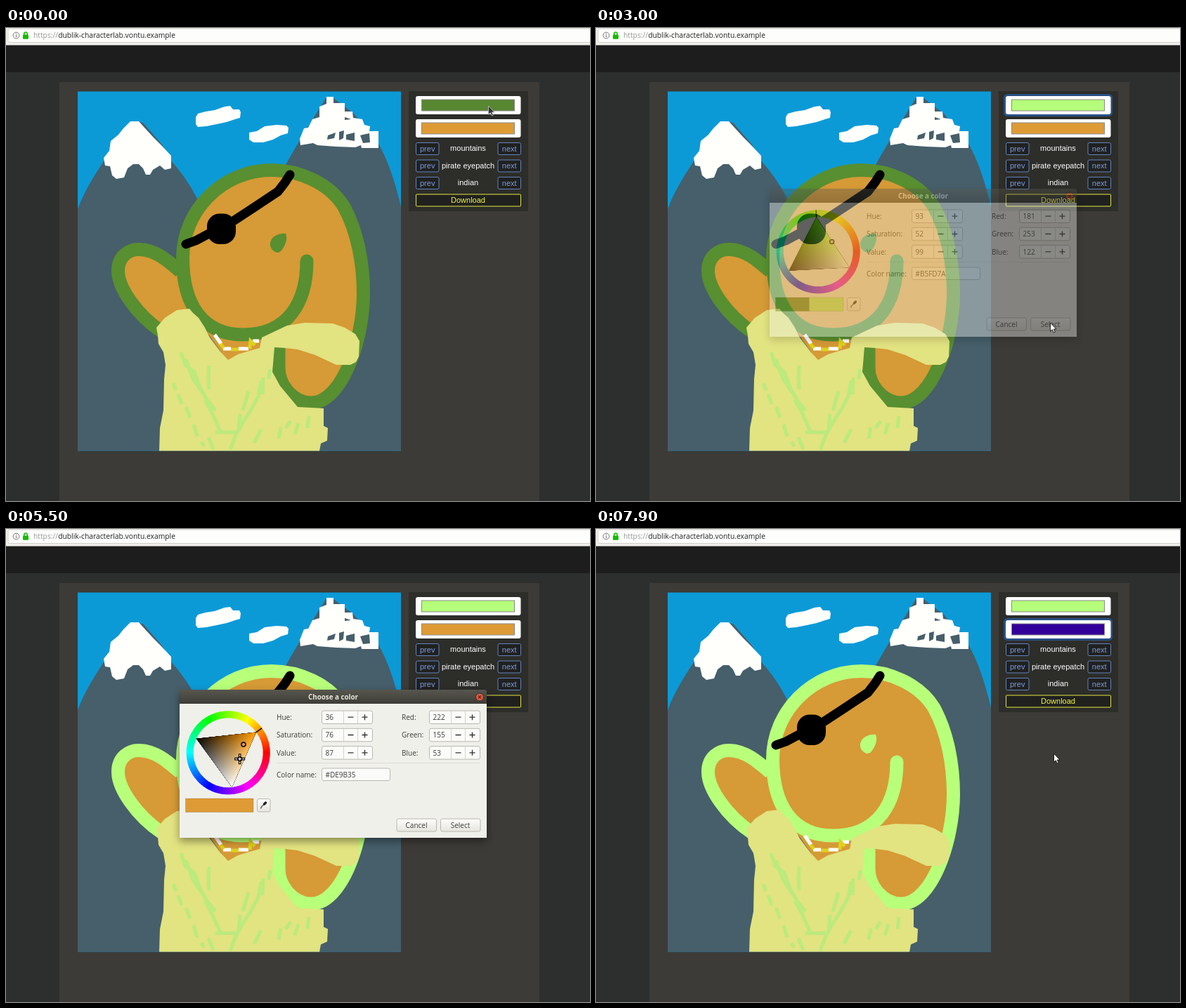
An HTML page for the animation above (8 s loop, 831 by 674 pixels).

```html
<!DOCTYPE html>
<html lang="en">
<head>
<meta charset="utf-8">
<title>Character colors</title>
<style>
html, body { margin: 0; width: 100%; height: 100%; overflow: hidden; background: #2d2f2e; }
svg { display: block; width: 100%; height: 100%; }
text { white-space: pre; }
.page { font: 11px "Liberation Sans", Arial, sans-serif; }
.ui { font: 10px "Open Sans", "Noto Sans", sans-serif; fill: #3c3c38; }
.add { mix-blend-mode: plus-lighter; }
#dialog { filter: drop-shadow(0 5px 6px rgba(0,0,0,.4)); }
</style>
</head>
<body>
<svg viewBox="0 0 831 674" preserveAspectRatio="none">
  <defs>
    <clipPath id="frame"><rect x="102" y="90.5" width="460" height="512"/></clipPath>
    <linearGradient id="title" x2="0" y2="1"><stop stop-color="#57564e"/><stop offset="1" stop-color="#3d3c37"/></linearGradient>
    <linearGradient id="button" x2="0" y2="1"><stop stop-color="#fdfdfb"/><stop offset="1" stop-color="#e6e5df"/></linearGradient>
    <linearGradient id="toHue" gradientUnits="userSpaceOnUse" x1="49.5" y1="0" x2="-24.75" y2="0"><stop id="hueStop"/><stop offset="1"/></linearGradient>
    <linearGradient id="toWhite" gradientUnits="userSpaceOnUse" x1="-24.75" y1="42.87" x2="12.37" y2="-21.43"><stop stop-color="#fff"/><stop offset="1"/></linearGradient>
  </defs>

  <rect width="831" height="674" fill="#2d2f2e"/>
  <rect y="24" width="831" height="39" fill="#1c1d1c"/>
  <rect width="831" height="24.5" fill="#f0efeb"/>
  <rect x="3" y="1" width="840" height="19.5" rx="2" fill="#fdfdfb" stroke="#d3d1ca"/>
  <circle cx="14.5" cy="10.5" r="4.4" fill="none" stroke="#777"/>
  <path d="M14.5 9.8V13M14.5 7.6V8.8" stroke="#777" stroke-width="1.1"/>
  <path d="M25.8 10V8.2a2.2 2.2 0 0 1 4.4 0V10" fill="none" stroke="#12bc00" stroke-width="1.6"/>
  <rect x="24" y="9.5" width="8" height="6.3" rx="1" fill="#12bc00"/>
  <text x="39" y="14.3" class="ui" style="font-size:10.3px"><tspan fill="#999">https://</tspan><tspan fill="#222">dublik-characterlab.vontu.example</tspan></text>

  <rect x="76" y="77" width="683" height="597" fill="#3c3b37"/>
  <g clip-path="url(#frame)">
    <rect x="102" y="90" width="460" height="513" fill="#0c9ad7"/>
    <path fill="#465f6a" d="M102 258Q112 230 139 190L181 133 195 135 222 166 235 189Q258 215 272 243L300 300 360 270Q385 215 418 160L455 100 465 99 495 122 530 165Q549 198 562 255V603H102Z"/>
    <g fill="#fffffc">
      <path d="M177 133H189L198 143 209 155 219 165 235 182V200L226 202 219 196 209 202 205 209 199 209 195 200 189 194 181 194 173 200 168 213 157 215 151 210 148 197 141 196 139 185 147 175 149 161 160 152 167 143Z"/>
      <path d="M456 98H466V107H482V119H493L494 128 507 130 510 138 518 140 517 147H530V171H506L505 167 497 170 470 169 443 167 437 164 419 167 418 158 424 143 430 142 436 130 446 127V112L456 108Z"/>
      <path d="M270 127L273 122 284 119 297 117 311 112 319 111 323 116H332L334 120 333 128 326 130 314 134 300 137 285 140 273 141 270 137Z"/>
      <path d="M346 149L357 147 368 140 385 138 399 139 402 142 401 150 391 153 380 159 366 163H352L346 159Z"/>
    </g>
    <path fill="#465f6a" d="M458 153L469 149 467 157 457 159ZM474 148L481 146 480 157 474 160ZM484 152L496 149V161L484 159ZM504 153L517 150 518 163 508 164ZM482 127L491 130 482 131Z"/>

    <g fill="none" stroke-width="19" stroke-linejoin="round" class="outline">
      <path class="skin" stroke="none" d="M222 428C185 405 160 370 159.5 345C159 325 175 315 190 315.5C212 316 230 332 248 350L262 400 240 430ZM280 425L370 425V460L316 476Z"/>
      <path d="M222 433C185 408 160 370 159.5 347C159 325 175 315 190 315.5C212 316 230 331 248 347"/>
      <path class="skin" stroke-linecap="round" d="M428 332C428 390 402 437 337 437C280 437 251.500 394 251.500 328C251.500 260 308 202.500 378 202.500C415 202.500 460 220 481 255C500 290 508.500 335 508.500 378C508.500 445 478 534 434 534C408 534 388 508 388 484V458"/>
    </g>
    <path class="eye" d="M378 301C382 295 391 292 398 293C401 300 398 308 394 314C390 321 385 322 379 316C375 311 375 306 378 301Z"/>
    <path fill="none" stroke="#000" stroke-width="13" stroke-linecap="round" stroke-linejoin="round" d="M256 308L270 303 285 295 325 274 360 251 387 233 397 220 404 209"/>
    <rect x="286" y="264.500" width="41" height="43.500" rx="18"/>

    <path fill="#e2e381" d="M216 438L214 427 226 413 243 402 261 400 266 406 274 413 283 427 290 441 305 461 316 473 330 465 350 459 361 456 364 441 400 424 425 420 465 421 482 427 497 436 503 446 502 468 498 476 490 480H470L440 466 415 458 398 456 382 455 379 490 390 510 415 540 452 542V567L458 570 457 588 448 592 446 603H218L219 570 224 545 225 500 227 480 224 462 217 450Z"/>
    <path fill="none" stroke="#bbea7d" stroke-width="5" d="M249 462L255 480 268 490 276 512 286 530 298 545M289 481L288 497 289 515M256 472L266 500 280 520M238 506L242 516M245 522L250 536M256 540L262 555M267 565L272 582M278 590L282 596M283 530L294 550 306 577M288 583L295 600M298 576H329M319 601L327 580 337 562 348 545 359 525 363 503M376 486L374 500M366 498L365 522M345 518L337 545M333 550L331 574M363 572L353 591M391 569L388 585M405 560L398 570M416 563L411 579M431 553L429 570"/>
    <g fill="none" stroke-width="5">
      <path stroke="#fff" d="M297 437L306 450M309 457H320M331 457H345M351 446H360"/>
      <path stroke="#ded21a" d="M305 450L310 456M320 458H331M347 457L348 446 354 452"/>
    </g>
  </g>

  <rect x="573" y="90" width="170" height="171" fill="#2d2d2a"/>
  <g id="panel" class="page" text-anchor="middle"></g>

  <g id="dialog" class="ui">
    <path d="M247 249.500V232q0-3 3-3H681q3 0 3 3V249.500Z" fill="url(#title)"/>
    <rect x="247" y="249" width="437" height="191" fill="#f0f0eb"/>
    <text x="465.5" y="242.8" text-anchor="middle" fill="#e8e6dd" style="font-weight:700;font-size:9.8px">Choose a color</text>
    <circle cx="674" cy="239.5" r="5.5" fill="#e2573a" stroke="#33322e"/>
    <path d="M672 237.5l4 4m0-4l-4 4" stroke="#5d2414" stroke-width="1.1"/>
    <g transform="translate(316.2 318.8)">
      <g id="ring" fill="none" stroke-width="10"></g>
      <g id="spin">
        <g style="isolation:isolate">
          <path fill="#000" d="M49.5 0L-24.75 -42.87V42.87Z"/>
          <path class="add" fill="url(#toHue)" d="M49.5 0L-24.75 -42.87V42.87Z"/>
          <path class="add" fill="url(#toWhite)" d="M49.5 0L-24.75 -42.87V42.87Z"/>
        </g>
        <path id="tick" d="M49.5 0H59.5" stroke-width="1.5"/>
      </g>
      <circle id="mark" r="3" fill="none" stroke-width="1.5"/>
    </g>
    <rect id="old" x="255.5" y="384" width="48.5" height="19.5"/>
    <rect id="now" x="303.5" y="384" width="48.5" height="19.5"/>
    <rect x="255.5" y="384" width="96.5" height="19.5" fill="none" stroke="#000" stroke-opacity=".15"/>
    <path d="M385 333.5H675" stroke="#dcdbd5"/>
    <g id="fields"></g>
    <path d="M362.500 398.500l1-2.500 4-4" stroke="#666" stroke-width="1.600" fill="none"/>
    <path d="M367.500 392l2-2" stroke="#222" stroke-width="3.400" stroke-linecap="round"/>
  </g>

  <g id="cursor">
    <path id="arrow" d="M.5 0V12.300L3.300 9.700 5.200 14 7.200 13.100 5.300 9H9Z"/>
    <g id="cross" fill="none"><path d="M-7.500 0H7.500M0-7.500V7.500" stroke="#000" stroke-width="3.600"/><path d="M-6.500 0H6.500M0-6.500V6.500" stroke="#fff" stroke-width="1.200"/><circle r="3" stroke="#000" stroke-width="1.200"/></g>
  </g>
</svg>
<script>
const $ = id => document.getElementById(id);
const LOOP = 8000, STEP = 100, RING = 49.5;
const GREEN = [88, 135, 49], LIME = [181, 253, 122], ORANGE = [222, 155, 53];
const VIOLET = [109, 53, 222], INDIGO = [51, 0, 153];

// Key lists: time followed by values
const opacity = [[300, 0], [400, .35], [500, .85], [600, 1], [2800, 1], [2900, .85], [3000, .4], [3100, 0],
  [4300, 0], [4400, .35], [4500, .85], [4600, 1], [7300, 1], [7400, .8], [7500, .4], [7600, 0]];
const pointer = [[0, 686, 111], [400, 685, 110], [800, 685, 110], [900, 555, 163], [1000, 555, 163],
  [1300, 343, 295], [1400, 343, 295], [1700, 308, 318], [2000, 308, 318], [2300, 335, 304], [2400, 335, 304],
  [2800, 646, 420], [3200, 646, 420], [3400, 749, 550], [3700, 708, 185], [3800, 706, 166], [3900, 707, 164],
  [4000, 707, 164], [4200, 676, 163], [4300, 676, 163], [4400, 673, 149], [4600, 673, 149], [5200, 345, 305],
  [6100, 308, 373], [6200, 307, 368], [6400, 307, 368], [6600, 309, 344], [6900, 329, 340], [7200, 642, 411],
  [7400, 642, 411], [7900, 651, 320]];
const outlinePick = [[2000, ...GREEN], [2300, ...LIME]];
const skinPick = [[6300, ...ORANGE], [6400, ...VIOLET], [6500, ...VIOLET], [6900, ...INDIGO]];

function at(keys, t) {
  if (t <= keys[0][0]) return keys[0].slice(1);
  for (let i = 1; i < keys.length; i++) {
    const a = keys[i - 1], b = keys[i];
    if (t <= b[0]) return a.slice(1).map((v, k) => v + (b[k + 1] - v) * (t - a[0]) / (b[0] - a[0]));
  }
  return keys[keys.length - 1].slice(1);
}

const rgb = c => `rgb(${c.join()})`;
const hex = c => '#' + c.map(v => v.toString(16).padStart(2, '0')).join('').toUpperCase();
const ink = ([r, g, b]) => .3 * r + .59 * g + .11 * b > 127 ? '#000' : '#fff';
const polar = (deg, r) => [r * Math.cos(deg * Math.PI / 180), -r * Math.sin(deg * Math.PI / 180)];

function toHsv([r, g, b]) {
  const max = Math.max(r, g, b), d = max - Math.min(r, g, b);
  const h = max === r ? (g - b) / d : max === g ? 2 + (b - r) / d : 4 + (r - g) / d;
  return [(h * 60 + 360) % 360, d / max, max / 255];
}
function pureHue(h) {
  return [0, 120, 240].map(o => {
    const d = Math.abs(((h - o + 540) % 360) - 180);
    return 255 * Math.min(1, Math.max(0, 2 - d / 60));
  });
}

const rect = (x, y, w, h, attrs) => `<rect x="${x}" y="${y}" width="${w}" height="${h}" ${attrs}/>`;
const text = (x, y, s, attrs = '') => `<text x="${x}" y="${y}" ${attrs}>${s}</text>`;

function buildPanel() {
  let s = '';
  [97, 130].forEach((y, i) => {
    s += rect(581.5, y - 1.5, 152, 29, `id="glow${i}" rx="4" fill="none" stroke="#285083" stroke-width="3"`)
      + rect(583, y, 149.5, 26, 'rx="3" fill="#fff"')
      + rect(591.5, y + 5, 132, 16, `id="swatch${i}" stroke="#8a8a86"`);
  });
  ['mountains', 'pirate eyepatch', 'indian'].forEach((name, i) => {
    const y = 163.5 + i * 24.5;
    s += text(657.5, y + 11.5, name, 'fill="#fff"');
    [[583.5, 'prev'], [700, 'next']].forEach(([x, label]) => {
      s += rect(x, y, 32.5, 17, 'rx="2" fill="#20211f" stroke="#6583bd"')
        + text(x + 16.2, y + 12.2, label, 'fill="#7b9be0"');
    });
  });
  s += rect(583.5, 237, 149, 17, 'rx="1" fill="#20211f" stroke="#e4e83c"') + text(657.5, 249.3, 'Download', 'fill="#f2f53c"');
  $('panel').innerHTML = s;
}

function buildDialog() {
  const box = (x, y, w, h, fill) => rect(x, y, w, h, `rx="2.5" fill="${fill}" stroke="#b9b7ae"`);
  let s = '';
  [[385, 449.5, ['Hue', 'Saturation', 'Value']], [563, 602.5, ['Red', 'Green', 'Blue']]].forEach(([lx, x, names]) =>
    names.forEach((name, i) => {
      const y = 259 + i * 25.3;
      s += text(lx, y + 13, name + ':') + box(x, y, 72, 18.5, '#fbfbf9')
        + text(x + 5, y + 13, '', `id="${name}"`)
        + `<path d="M${x + 31} ${y + .5}v17.500M${x + 51} ${y + .5}v17.500" stroke="#d5d3cb"/>`
        + `<path d="M${x + 37} ${y + 9.2}h8M${x + 57} ${y + 9.2}h8m-4-4v8" stroke="#333" stroke-width="1.300"/>`;
    }));
  s += text(385, 353.5, 'Color name:') + box(449.5, 341, 97, 17.5, '#fbfbf9') + text(454.5, 353.5, '', 'id="hex"')
    + box(357.5, 384.5, 18.5, 18.5, 'url(#button)');
  [[556, 'Cancel'], [618.5, 'Select']].forEach(([x, label]) => {
    s += box(x, 413, 56.5, 18, 'url(#button)') + text(x + 28, 425.7, label, 'text-anchor="middle"');
  });
  $('fields').innerHTML = s;
  let ring = '';
  for (let a = 0; a < 360; a += 2) {
    ring += `<path d="M${polar(a - 1.3, 54.5)}A54.500 54.500 0 0 0 ${polar(a + 1.3, 54.5)}" stroke="hsl(${a},100%,50%)"/>`;
  }
  $('ring').innerHTML = ring;
}

const set = (id, attrs) => Object.entries(attrs).forEach(([k, v]) => $(id).setAttribute(k, v));
const paint = (selector, prop, value) => document.querySelectorAll(selector).forEach(e => e.style[prop] = value);

function drawDialog(color, before) {
  const [h, s, v] = toHsv(color), pure = pureHue(h);
  const values = { Hue: h, Saturation: s * 100, Value: v * 100, Red: color[0], Green: color[1], Blue: color[2] };
  for (const name in values) $(name).textContent = Math.round(values[name]);
  $('hex').textContent = hex(color);
  set('old', { fill: rgb(before) });
  set('now', { fill: rgb(color) });
  set('hueStop', { 'stop-color': rgb(pure) });
  set('spin', { transform: `rotate(${-h})` });
  set('tick', { stroke: ink(pure) });
  const top = polar(h, RING), black = polar(h + 120, RING), white = polar(h + 240, RING);
  const spot = [0, 1].map(k => black[k] * (1 - v) + white[k] * v * (1 - s) + top[k] * v * s);
  set('mark', { transform: `translate(${spot})`, stroke: ink(color) });
  return h;
}

function drawCursor(t, hue, open) {
  const [x, y] = at(pointer, t), dx = x - 316.2, dy = y - 318.8, dist = Math.hypot(dx, dy);
  const inside = open && [0, 120, 240].every(o => {
    const [nx, ny] = polar(hue + o, 1);
    return dx * nx + dy * ny > -RING / 2;
  });
  const dark = t < 400 || (open && !inside && dist > 48 && dist < 60);
  set('cursor', { transform: `translate(${x} ${y})` });
  set('cross', { visibility: inside ? 'visible' : 'hidden' });
  set('arrow', { visibility: inside ? 'hidden' : 'visible', fill: dark ? '#333' : '#fff', stroke: dark ? '#bbb' : '#111', 'stroke-width': .9 });
}

function draw(time) {
  const t = Math.floor(time % LOOP / STEP) * STEP;
  const outline = at(outlinePick, t).map(Math.round), skin = at(skinPick, t).map(Math.round);
  const first = t < 3200, alpha = at(opacity, t)[0];
  set('swatch0', { fill: rgb(outline) });
  set('swatch1', { fill: rgb(skin) });
  set('glow0', { visibility: t >= 3000 && t < 4400 ? 'visible' : 'hidden' });
  set('glow1', { visibility: t >= 7500 ? 'visible' : 'hidden' });
  const line = t < 3300 ? '#588f30' : '#b8ff7a';
  paint('.outline', 'stroke', line);
  paint('.eye', 'fill', line);
  paint('.skin', 'fill', '#d69a36');
  const hue = drawDialog(first ? outline : skin, first ? GREEN : ORANGE);
  $('dialog').style.opacity = alpha;
  $('dialog').style.display = alpha ? '' : 'none';
  drawCursor(t, hue, alpha > .5);
}

buildPanel();
buildDialog();
const start = performance.now();
function tick() {
  draw(performance.now() - start);
  requestAnimationFrame(tick);
}
tick();
</script>
</body>
</html>
```
